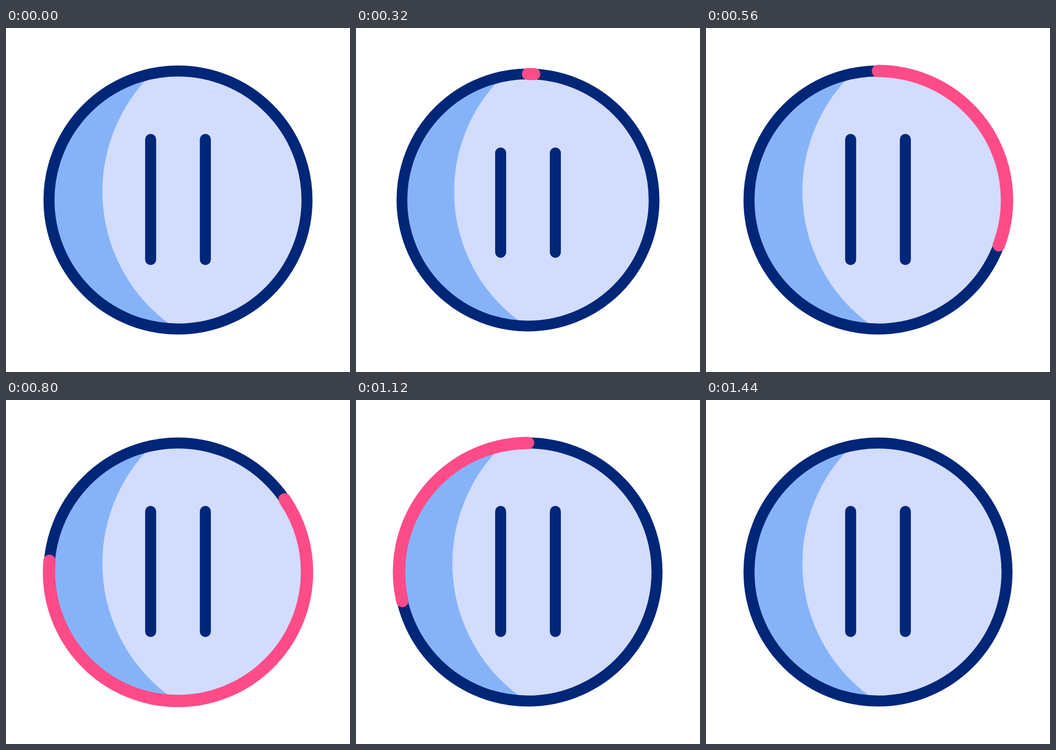
An HTML page that plays this animation: 640 px wide and 640 px high, repeating every 1.48 s.

```html
<!DOCTYPE html>
<html lang="en">
<head>
<meta charset="utf-8">
<title>Pause button</title>
<style>
  html, body { margin: 0; width: 100%; height: 100%; overflow: hidden; background: #fff; }
  svg { display: block; width: 100%; height: 100%; }
  .line { fill: none; stroke: #002678; stroke-width: 20.48; stroke-linecap: round; }
  #arc { stroke: #ff4c89; stroke-width: 23.04; }
</style>
</head>
<body>
<svg viewBox="0 0 640 640">
  <clipPath id="disc"><circle cx="320" cy="320" r="240"/></clipPath>
  <g id="dial">
    <circle cx="320" cy="320" r="240" fill="#86b3f8"/>
    <circle cx="486" cy="304" r="306.7" fill="#d2dcfc" clip-path="url(#disc)"/>
    <circle class="line" cx="320" cy="320" r="240"/>
    <path class="line" id="arc" pathLength="1" d="M320 80A240 240 0 0 1 320 560A240 240 0 0 1 320 80"/>
  </g>
  <path class="line" id="bars"/>
</svg>
<script>
  const LOOP = 1480, STEP = 40;
  const [dial, arc, bars] = ['dial', 'arc', 'bars'].map(id => document.getElementById(id));

  // Eased progress from 0 to 1 between two times
  const ease = (t, from, to) => {
    const s = Math.min(1, Math.max(0, (t - from) / (to - from)));
    return s * s * (3 - 2 * s);
  };

  function draw(t) {
    const pinch = ease(t, 120, 280) - ease(t, 280, 440);
    dial.setAttribute('transform', `translate(320 320) scale(${1 - 0.027 * pinch}) translate(-320 -320)`);

    const top = 207.3 + 30 * pinch, bottom = 430.7 - 16 * pinch;
    bars.setAttribute('d', `M269.1 ${top}V${bottom}M370.9 ${top}V${bottom}`);

    const head = ease(t, 280, 1040), tail = ease(t, 600, 1404);
    arc.style.visibility = head > tail ? 'visible' : 'hidden';
    arc.style.strokeDasharray = `${(head - tail).toFixed(6)} 2`;
    arc.style.strokeDashoffset = (-tail).toFixed(6);
  }

  // The motion runs at 25 pictures per second
  function tick() {
    const t = performance.now() % LOOP;
    draw(Math.floor(t / STEP) * STEP);
    requestAnimationFrame(tick);
  }
  tick();
</script>
</body>
</html>
```
